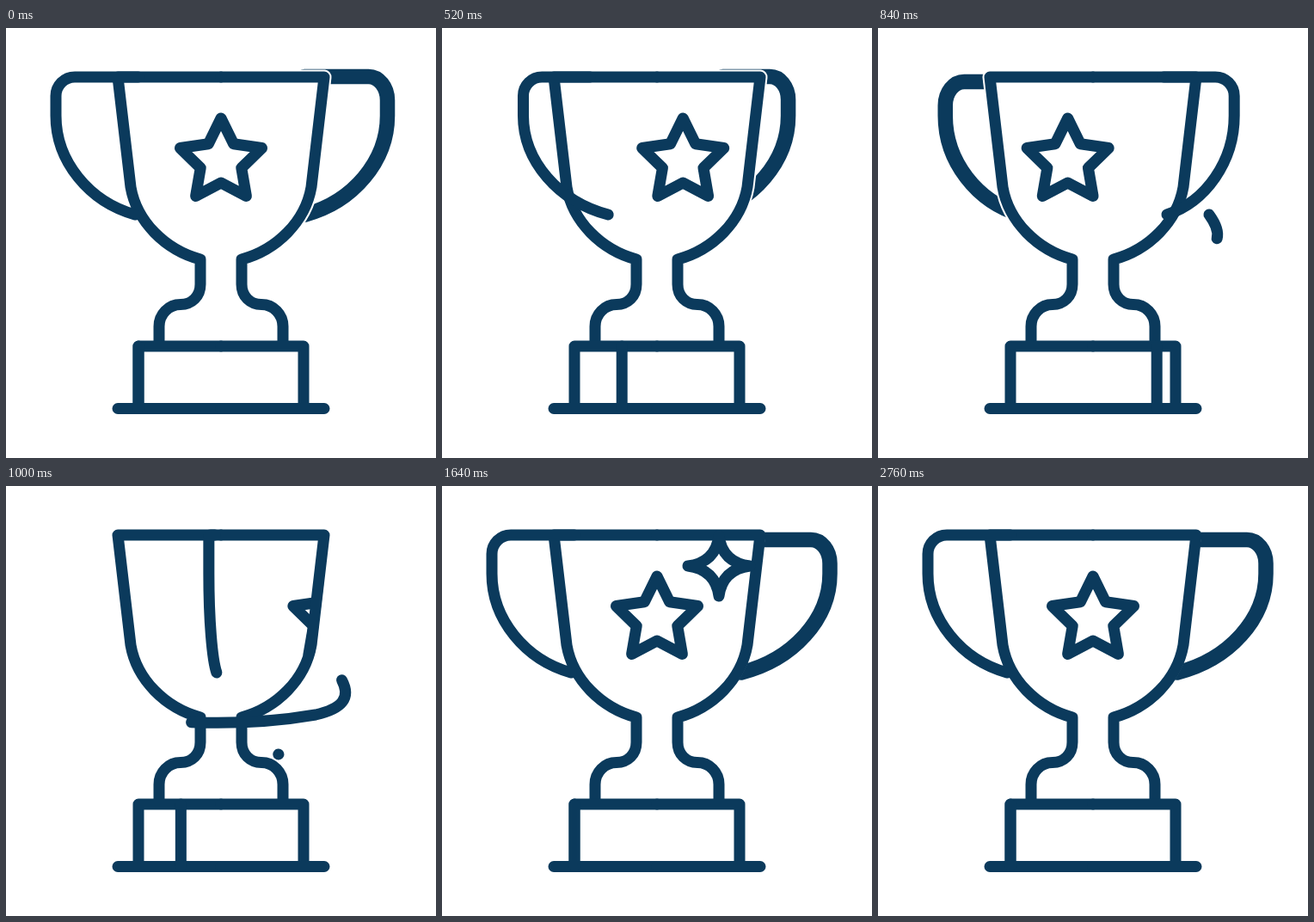
An HTML page that plays this animation: 500 px wide and 500 px high, repeating every 3 s.

```html
<!DOCTYPE html>
<html lang="en">
<head>
<meta charset="utf-8">
<title>Trophy</title>
<style>
  html, body { margin: 0; width: 100%; height: 100%; overflow: hidden; background: #fff; }
  svg { display: block; width: 100%; height: 100%; }
  .line { fill: none; stroke: #0b3a5c; stroke-width: 13; stroke-linecap: round; stroke-linejoin: round; }
</style>
</head>
<body>
<svg viewBox="0 0 500 500">
  <defs>
    <clipPath id="inside">
      <path d="M124 57L139 185C146 229 181 264 226 275H274C319 264 354 229 361 185L376 57Z"/>
    </clipPath>
    <path id="star"/>
    <g id="half">
      <path d="M250 57H130L145 185C152 225 185 258 226 269V298C226 312 216 321.500 203 321.500
               C189 321.500 178 333 178 347V368"/>
      <path d="M250 370H154V442M250 442.500H130"/>
    </g>
  </defs>
  <path id="back" class="line" style="stroke-width: 17.5px"/>
  <path id="mask" d="M130 57L145 185C152 225 185 258 226 269H274C315 258 348 225 355 185L370 57Z"
        fill="#fff" stroke="#fff" stroke-linejoin="round"/>
  <g class="line" clip-path="url(#inside)">
    <use id="starA" href="#star"/>
    <use id="starB" href="#star"/>
  </g>
  <g class="line">
    <use href="#half"/>
    <use href="#half" transform="matrix(-1 0 0 1 500 0)"/>
    <path id="edge"/>
    <path id="front"/>
    <path id="wideTrail" pathLength="1"
          d="M385 217C404 243 395 258 360 266C290 278 210 278 140 268C105 261 90 246 113 217"/>
    <path id="neckTrail" pathLength="1" d="M317 312Q244 316 171 312"/>
    <path id="sparkle" d="M0 -35Q4 -4 36 0Q4 4 0 35Q-4 4 -36 0Q-4 -4 0 -35Z"/>
  </g>
</svg>
<script>
const LOOP = 3000, STEP = 40, TURN_BACK = 800, QUICK_START = 0.72, STAR_GAP = 340;
const el = id => document.getElementById(id);
const set = (id, name, value) => el(id).setAttribute(name, value);
const clamp = (v, low, high) => Math.max(low, Math.min(high, v));
const mix = (a, b, p) => a + (b - a) * p;

// Smooth step from 0 to 1; a power below 1 gives a quicker start.
function ease(t, from, to, power = 1) {
  const u = clamp((t - from) / (to - from), 0, 1) ** power;
  return u * u * (3 - 2 * u);
}

// Half a turn out, then back again.
const swing = (t, from, to, backEnd) =>
  ease(t, from, to) - ease(t, TURN_BACK, backEnd, QUICK_START);

function starPath(cx, cy, outer, inner) {
  const points = Array.from({ length: 10 }, (_, i) => {
    const r = i % 2 ? inner : outer, angle = i * Math.PI / 5;
    return [cx + r * Math.sin(angle), cy - r * Math.cos(angle)];
  });
  return `M${points.join("L")}Z`;
}

function handle(side, end, top, tall) {
  const r = clamp((250 - side) * 0.14, -22, 22);
  const drop = Math.abs(r) * tall;
  return `M${mix(side, 250, 0.5)} ${top}H${side + r}`
    + `C${side + r * 0.45} ${top} ${side} ${top + drop * 0.45} ${side} ${top + drop}`
    + `V102C${side} 155 ${mix(side, end, 0.42)} 202 ${end} 217`;
}

function trail(id, from, to) {
  const length = to - from;
  el(id).style.display = length > 0.001 ? "" : "none";
  set(id, "stroke-dasharray", `${length} 3`);
  set(id, "stroke-dashoffset", -from);
}

function draw(t) {
  const endTurn = swing(t, 400, 800, 1300);
  const frontSide = mix(58, 442, swing(t, 460, 775, 1290));
  set("front", "d", handle(frontSide, mix(150, 350, endTurn), 57, 1));

  // The far handle settles lower and wider while it is hidden by the cup.
  const settle = ease(t, 560, 640);
  const backSide = mix(mix(443.5, 451, settle), 50, swing(t, 460, 760, 1300));
  set("back", "d", handle(backSide, mix(348, 152, endTurn), mix(56.5, 62.5, settle), 1.25));
  set("mask", "stroke-width", mix(17, 12, ease(t, 1240, 1400)));

  const shift = STAR_GAP * swing(t, 475, 720, 1230);
  set("starA", "x", shift);
  set("starB", "x", shift - STAR_GAP);
  set("edge", "d", `M${mix(154, 346, swing(t, 390, 757, 1150))} 370V442`);

  trail("wideTrail",
    1 - ease(t, 520, 700) + ease(t, 955, 1408),
    1 - ease(t, 560, 755) + ease(t, TURN_BACK, 1250, QUICK_START));
  trail("neckTrail", ease(t, 1160, 1440), ease(t, 990, 1380));

  const size = ease(t, 1400, 1640) - ease(t, 2480, 2760);
  el("sparkle").style.display = size > 0.001 ? "" : "none";
  set("sparkle", "transform", `translate(322 93) scale(${size})`);
}

set("star", "d", starPath(250, 155, 50, 25));
const start = performance.now();
function tick() {
  const t = (performance.now() - start) % LOOP;
  draw(Math.floor(t / STEP) * STEP);
  requestAnimationFrame(tick);
}
tick();
</script>
</body>
</html>
```
